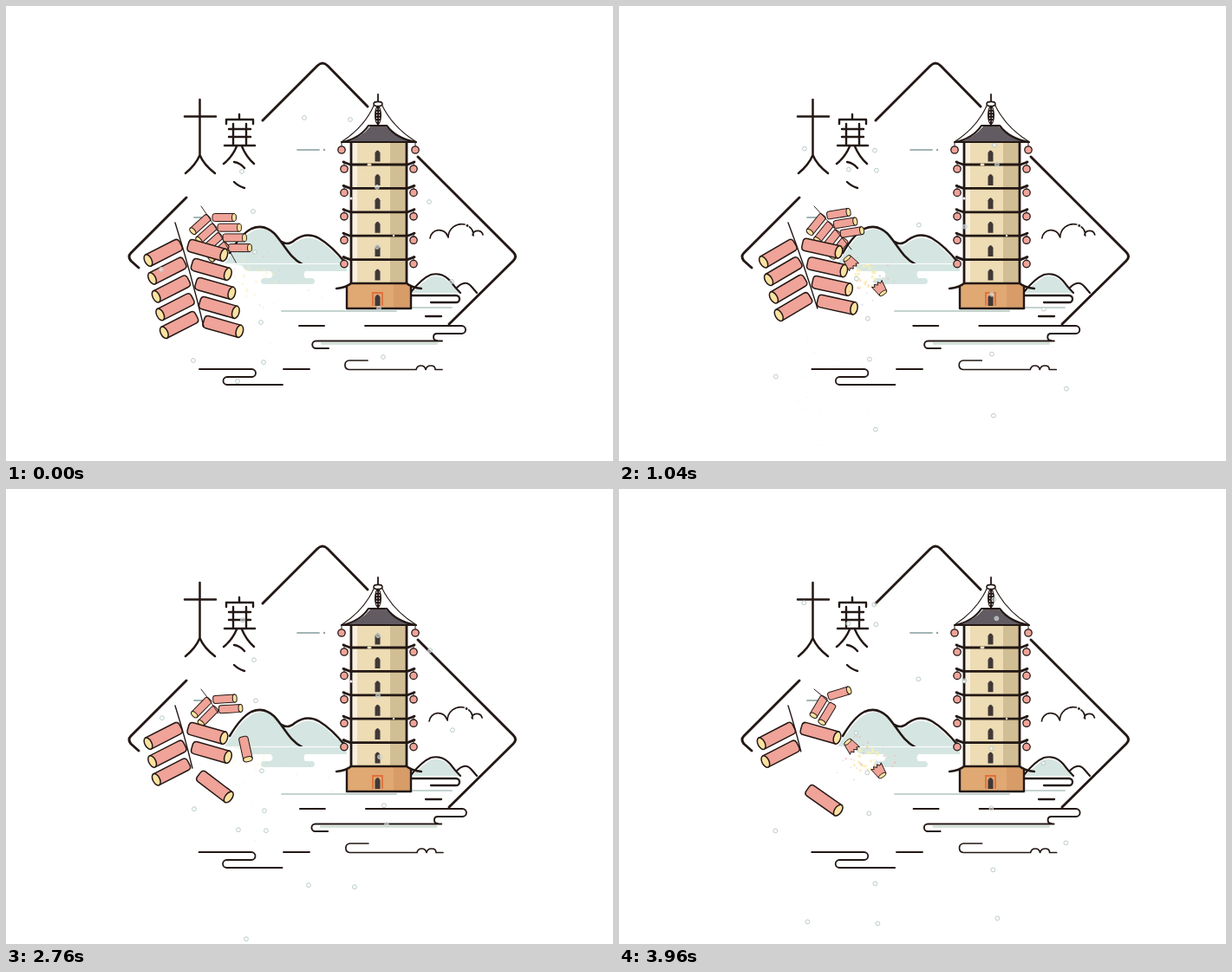
Recreate the animation shown at these times as an HTML page. Size 700x525 px, loop 4000 ms.

```html
<!DOCTYPE html>
<html lang="zh">
<head>
<meta charset="utf-8">
<title>大寒</title>
<style>
html, body { margin: 0; width: 100%; height: 100%; overflow: hidden; background: #fff; }
svg { display: block; width: 100vw; height: 100vh; }
.ink { fill: none; stroke: #231815; stroke-linecap: round; stroke-linejoin: round; }
</style>
</head>
<body>
<svg id="stage" viewBox="0 0 700 525"></svg>
<script>
const LOOP = 4000, SNOW_LOOP = 3200, STEP = 40;
const INK = '#231815', PINK = '#f0a398', CAP = '#fbe2a0', MIST = '#d5e6e2';

const ink = (d, w) => `<path class="ink" stroke-width="${w}" d="${d}"/>`;
const fill = (d, c) => `<path fill="${c}" d="${d}"/>`;
const line = (d, c, w) => `<path fill="none" stroke="${c}" stroke-width="${w}" stroke-linecap="round" d="${d}"/>`;
const dot = (x, y, r, c, o = 1) => `<circle cx="${x}" cy="${y}" r="${r}" fill="${c}" opacity="${o}"/>`;
const times = (n, f) => Array.from({ length: n }, (_, i) => f(i)).join('');
const rnd = n => { const s = Math.sin(n * 127.1 + 11.7) * 43758.5453; return s - Math.floor(s); };

function frame() {
  return ink('M296 132L359 69Q365 63 371 69L417 116M475 174L585 284Q590 289 585 294L511 367M208 221L144 285Q140 289 144 294L153 302', 2.9);
}

function title() {
  return ink('M206 127.500H242M223.500 108V172Q219 183 207 193M223.500 172Q228 183 241 193', 2.5) +
    ink('M269 125V130M254 136V131H285V136M262 136V161M277 136V161M257 142H282M257 151H282M252 161H287' +
      'M266 162Q261 174 251 182M272 162Q277 174 286 182M263 180Q270 181 275 187M263 203Q268 208 275 210', 2.4);
}

function hills() {
  return fill('M252 297Q262 283 269 273Q292 246 311 265Q320 276 328 277Q348 259 369 276Q381 289 394 297Z', MIST) +
    ink('M258 285Q271 263 283 257Q297 251 309 262C320 273 326 290 342 298M318 272Q325 277 333 270Q347 260 361 268Q376 277 391 296', 2.5) +
    fill('M258 298H393V306H345Q342 310 345 314H352Q356 314 356 317.500T352 321H298Q294 321 294 317.500T298 314H305Q310 310 305 306H282Q275 306 272 299Z', MIST) +
    line('M270 297.500H392', '#fff', 1.2) +
    fill('M468 331Q482 317 491 312Q504 310 511 319L524 331Z', MIST) +
    ink('M467 330Q480 314 490 310Q503 307 512 317Q518 325 524 331M520 325Q530 315 537 324L543 331', 2.1) +
    ink('M467 334H519A4 4 0 0 1 519 342H490M484 358H502', 2.3) +
    line('M318 352H450M467 348H514', '#c3d4cf', 2) +
    line('M336 166H361M217 244H232', '#a3b5b5', 1.8) + dot(367, 166, 1.2, '#8fa3a3');
}

function lantern(x, y) {
  return ink(`M${x} ${y - 9}V${y - 4}`, 1) +
    `<circle cx="${x}" cy="${y}" r="4.200" fill="${PINK}" stroke="${INK}" stroke-width="1.300"/>`;
}

function pagoda() {
  const win = y => fill(`M425.500 ${y + 7}V${y - 3}Q428.500 ${y - 9} 431.500 ${y - 3}V${y + 7}Z`, '#403838');
  const floor = i => {
    const y = 183 + i * 27.4;
    return ink(`M389 ${y - 3}L397 ${y}H463L471 ${y - 3}`, 2.8) + lantern(390, y + 5) + lantern(470, y + 5);
  };
  return fill('M398 157H462V320H398Z', '#eddcb4') + fill('M399 157H405V320H399Z', '#f8f0de') +
    fill('M443 157H462V320H443Z', '#d2be94') +
    ink('M398 157V320M462 157V320', 2.8) + times(6, i => win(172.5 + i * 27.4)) + times(5, floor) +
    line('M418 183H420', '#f0dfba', 3) + dot(398, 222, 1.6, '#fff') + dot(447, 265, 1.2, '#f5ead0') +
    fill('M391 156.500Q410 152 420 139H438Q449 152 470 156.500Z', '#625c62') +
    ink('M387 157Q408 153 418 138H439Q450 153 473 157Z', 2.2) +
    ink('M425 113Q414 139 388 156M433 113Q445 139 472 156', 1.1) +
    ink('M429 102V137', 1.8) +
    '<ellipse cx="429" cy="113" rx="5" ry="2.600" fill="#fff" stroke="#231815" stroke-width="1.600"/>' +
    '<ellipse cx="429" cy="126" rx="4" ry="11" fill="#231815"/>' +
    times(5, i => dot(427.6, 119 + i * 3.5, 0.7, '#fff') + dot(430.6, 119 + i * 3.5, 0.7, '#fff')) +
    lantern(387, 166) + lantern(472, 166) +
    fill('M393 321H467V349H393Z', '#e0a873') + fill('M447 321H467V349H447Z', '#d79c68') +
    ink('M381 326Q392 325 398 320H462Q468 325 479 326M393 323V349H467V323', 2.4) +
    line('M423 345V331H434V345', '#e0703c', 1.8) + win(339);
}

// Lines on the water and the cloud sway back and forth.
function drift(t) {
  const s = 1 - Math.cos(t / 1600 * 2 * Math.PI);
  const shift = (x, body) => `<g transform="translate(${x} 0)">${body}</g>`;
  return shift(s * 0.8, ink('M338 369H367M414 369H525.500A4.500 4.500 0 0 1 525.500 378H497Q493 378 493 382T497 386', 1.9) +
      ink('M417 409H395.500A5.300 5.300 0 0 0 395.500 419.500H473Q474 415 478.500 415T484 419.500Q485 415 490 415T495 419.500H503', 1.7)) +
    shift(-s * 0.7, line('M364 389.500H497', '#cfdfd3', 2.4) + ink('M503 386.500H357.500A4.200 4.200 0 0 0 357.500 395H372', 1.9)) +
    shift(-s * 0.4, ink('M223 419H283.500A4.400 4.400 0 0 1 283.500 428H255A4.400 4.400 0 0 0 255 437H319', 1.8)) +
    ink('M320 419H350', 1.8) +
    shift(-s * 0.8, ink('M489 268A10.500 10.500 0 0 1 509.500 266M510 267A15.500 15.500 0 0 1 529 252M534.500 255Q539 258 539 265M538 264A6.200 6.200 0 0 1 550 264', 1.7) + dot(532, 253.5, 1.4, INK));
}

const FLAKES = [[344, 129], [397, 131], [272, 191], [428, 209], [488, 226], [285, 237], [428, 278], [287, 284],
  [179, 304], [514, 318], [430, 349], [294, 365], [435, 405], [216, 409], [297, 411], [267, 433], [295, 66], [434, 59]];

function snow(t) {
  const s = t % SNOW_LOOP;
  const flake = (x, y) => y < 126 || y > 522 ? '' :
    `<circle cx="${x}" cy="${y}" r="2.400" fill="#fff" fill-opacity=".5" stroke="#bccaca"/>`;
  return FLAKES.map(([x, y]) => {
    const fx = x + s * 0.0018, fy = y + s * 0.1189;
    return flake(fx, fy) + flake(fx - 4, fy - 368);
  }).join('');
}

// A tube that starts at (x, y) and ends in a cap.
function tube(p, opacity = 1) {
  const { x, y, a, len, w } = p, h = w / 2, r = h * 0.6;
  return `<g transform="translate(${x} ${y}) rotate(${a})" stroke="${INK}" stroke-width="${w > 12 ? 1.5 : 1}" opacity="${opacity}">` +
    `<path fill="${PINK}" d="M${len} ${-h}H${r}Q0 ${-h} 0 ${-h + r}V${h - r}Q0 ${h} ${r} ${h}H${len}Z"/>` +
    `<ellipse cx="${len}" rx="${h * 0.55}" ry="${h}" fill="${CAP}"/></g>`;
}

// Poses listed in the order in which they come loose: right, left, from the bottom up.
function poses(n, right, left) {
  const list = [];
  for (let row = n - 1; row >= 0; row--) list.push({ row, ...right(row) }, { row, left: true, ...left(row) });
  return list;
}

const BIG = {
  pivot: [195, 250], drops: [20, 470, 1150, 1690, 2600, 2938, 3673], fall: 300, life: 360,
  swing: [[0, 0], [680, 1.5], [1040, -3.5], [1680, 0.5], [2280, 0.6], [3200, -0.7], [3960, -0.3]],
  list: poses(5, i => ({ x: 210 + 4.5 * i, y: 275.5 + 22 * i, a: 16, len: 43, w: 14.5 }),
    i => ({ x: 201.4 + 4.6 * i, y: 274.5 + 20.8 * i, a: 153, len: 42, w: 14.5 })),
  string: n => { const l = 120 - (10 - n) * 9.6; return [l * 0.275, l]; }, width: 1.4
};
const SMALL = {
  pivot: [225, 231], drops: [690, 1350, 2040, 2570, 3620], fall: 230, life: 600, target: [284, 311],
  swing: [[0, 0], [680, -10], [1040, -9], [1680, -1], [2280, -10], [3200, 2], [3960, -17]],
  list: poses(4, i => ({ x: 238 + 6 * i, y: 244 + 11.7 * i, a: 0, len: 25, w: 9 }),
    i => ({ x: 234 + 7 * i, y: 243 + 10.5 * i, a: 138, len: 25, w: 9 })),
  string: n => { const l = 65 - (8 - n) * 9; return [l * 0.62, l]; }, width: 0.9
};

function sample(keys, t) {
  const i = keys.findIndex(k => k[0] > t);
  if (i < 0) return keys[keys.length - 1][1];
  const [t0, v0] = keys[i - 1], [t1, v1] = keys[i];
  return v0 + (v1 - v0) * (1 - Math.cos((t - t0) / (t1 - t0) * Math.PI)) / 2;
}

function hanging(s, t) {
  const gone = s.drops.filter(d => d <= t).length;
  const [dx, dy] = s.string(s.list.length - gone), [px, py] = s.pivot;
  return `<g transform="rotate(${sample(s.swing, t)} ${px} ${py})">` +
    s.list.slice(gone).map(p => tube(p)).join('') +
    ink(`M${px} ${py}Q${px + dx * 0.52} ${py + dy * 0.45} ${px + dx} ${py + dy}`, s.width) + '</g>';
}

const middle = p => {
  const r = p.a * Math.PI / 180;
  return [p.x + Math.cos(r) * p.len / 2, p.y + Math.sin(r) * p.len / 2];
};

// Same tube placed by its middle.
function centred(p, cx, cy, a) {
  const r = a * Math.PI / 180;
  return { ...p, a, x: cx - Math.cos(r) * p.len / 2, y: cy - Math.sin(r) * p.len / 2 };
}

function half(x, y, a, o) {
  return `<g transform="translate(${x} ${y}) rotate(${a})" opacity="${o}" stroke="${INK}" stroke-width=".9">` +
    `<path fill="${PINK}" d="M7 -5L-6 -7L-4 -4L-7 -2L-4 0L-7 3L-4 4L-6 7L7 5Z"/>` +
    `<ellipse cx="7" rx="2" ry="5" fill="${CAP}"/></g>`;
}

// A flash with sparks; given an angle, the tube also tears in two along it.
function burst(x, y, u, seed, tear) {
  const torn = tear !== undefined;
  const grow = 1 - (1 - u) ** 2, fade = 1 - u, reach = torn ? 95 : 75;
  let out = '';
  if (torn && u < 0.13) {
    out += times(14, i => {
      const a = i * 0.449, r = 14 + 6 * rnd(seed + i);
      return line(`M${x + Math.cos(a) * 5} ${y + Math.sin(a) * 5}L${x + Math.cos(a) * r} ${y + Math.sin(a) * r}`, '#d3d9f0', 2);
    });
  }
  out += times(22, i => {
    const a = i * 0.571 + rnd(seed + i), r = (torn ? 7 : 16) + 24 * grow * rnd(seed + i + 40);
    return dot(x + Math.cos(a) * r, y + Math.sin(a) * r, torn ? 1.7 : 1.2, '#fbeeb0', fade * (torn ? 1 : 0.5));
  });
  out += times(34, i => {
    const a = rnd(seed + i + 80) * 6.283, r = reach * grow * (0.25 + rnd(seed + i + 120));
    return dot(x + Math.cos(a) * r, y + Math.sin(a) * r * 0.8 + 22 * u * u, 0.6 + 0.6 * rnd(seed + i),
      i % 4 ? '#f3b3aa' : '#d8dcec', fade * (torn ? 0.9 : 0.4));
  });
  if (torn && u > 0.06 && u < 0.55) {
    const a = tear * Math.PI / 180, d = 9 + 65 * u, o = Math.min(1, (0.55 - u) * 6);
    const dx = Math.cos(a) * d, dy = Math.sin(a) * d;
    out += half(x - dx, y - dy, tear + 190, o) + half(x + dx, y + dy, tear + 15, o);
  }
  return out;
}

function loose(s, t) {
  return s.drops.map((start, i) => {
    const age = t - start, p = s.list[i], [mx, my] = middle(p);
    if (age < 0 || age > s.fall + s.life) return '';
    const k = Math.min(1, age / s.fall), q = k * k;
    const [ex, ey] = s.target || [mx + (p.left ? 30 : 0), my + 60];
    const tear = s.target && (p.left ? 78 : 41);
    const turn = s.target ? tear - 13 - p.a : p.row * (p.left ? -16 : 20);
    const x = mx + (ex - mx) * (s.target ? k : q), y = my + (ey - my) * q;
    const body = { ...p, len: s.target ? 25 + 2 * k : p.len, w: p.w + (s.target ? 2 * k : 0) };
    const flying = centred(body, x, y, p.a + turn * k);
    if (k < 1) return tube(flying);
    const u = (age - s.fall) / s.life;
    return burst(ex, ey, u, i * 31 + p.len, tear) + (s.target && u < 0.06 ? tube(flying, 0.6) : '');
  }).join('');
}

function draw(t) {
  const [bx, by] = SMALL.target;
  const tail = t < 200 ? burst(bx, by, (t + 400) / 600, 9, 41) : '';
  live.innerHTML = drift(t) + hanging(SMALL, t) + hanging(BIG, t) + tail + loose(SMALL, t) + loose(BIG, t) + snow(t);
}

const stage = document.getElementById('stage');
stage.innerHTML = frame() + title() + hills() + pagoda() + '<g id="live"></g>';
const live = document.getElementById('live');
const began = performance.now();

function tick() {
  const t = (performance.now() - began) % LOOP;
  draw(Math.floor(t / STEP) * STEP);
  requestAnimationFrame(tick);
}
tick();
</script>
</body>
</html>
```
